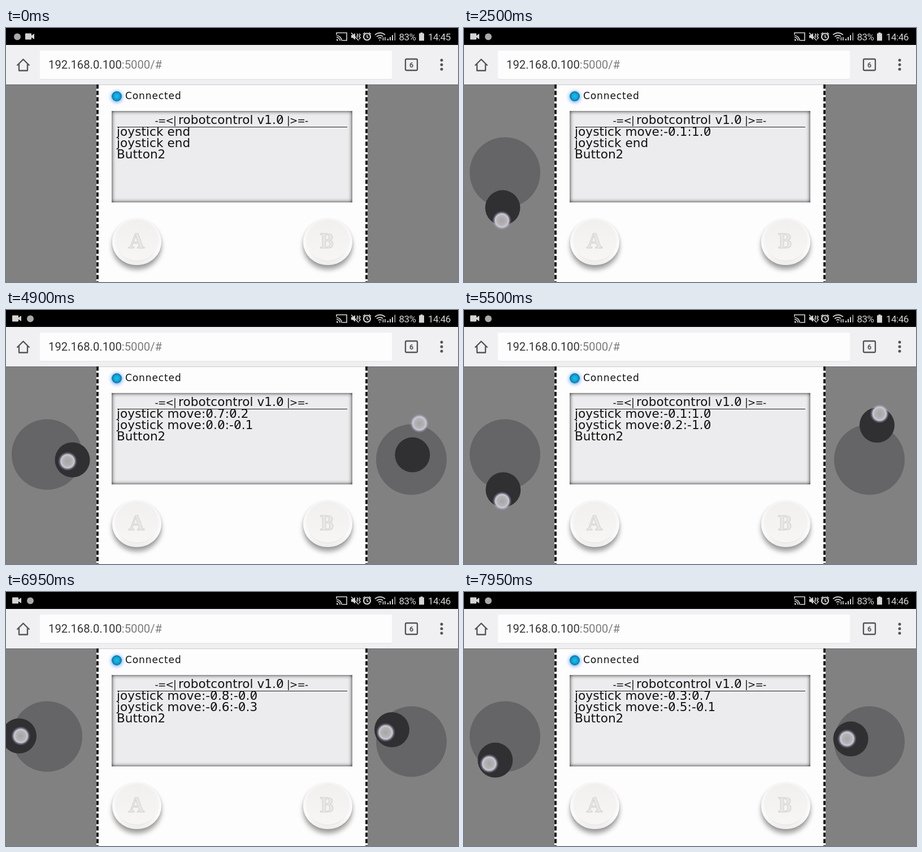
Write an HTML page that moves like this. It is 800 px wide and 450 px high and loops after 8000 ms.

```html
<!DOCTYPE html>
<html lang="en">
<head>
<meta charset="utf-8">
<title>robotcontrol</title>
<style>
  html, body { margin: 0; width: 100%; height: 100%; overflow: hidden; background: #828182; }
  .stage { position: relative; width: 800px; height: 450px; overflow: hidden; }
  .stage > * { position: absolute; box-sizing: border-box; }
  .page { left: 160px; top: 100px; width: 480px; height: 350px; background: #fefdfe; }
  .led { left: 187px; top: 112px; width: 18px; height: 18px; border-radius: 50%;
    background: radial-gradient(circle, #12c4e4 0, #0fa6d6 40%, #0b70ae 70%, #104a78 100%);
    box-shadow: 0 1px 6px 1px #6fa8f4; }
  .lcd { left: 187px; top: 146.5px; width: 426px; height: 162px; background: #ecebed;
    box-shadow: inset 0 0 7px rgba(0,0,0,.9); }
  .btn { top: 338px; width: 87px; height: 82px; border-radius: 50%;
    background: linear-gradient(#f6f5f4, #fcfbfb 70%, #eeedeb);
    box-shadow: 0 8px 9px rgba(0,0,0,.36), 0 1px 4px rgba(0,0,0,.12); }
  .btn::before { content: ""; position: absolute; left: 6px; top: 2px; width: 75px; height: 72px;
    border-radius: 50%; background: linear-gradient(#f1f0ee, #f7f6f4);
    box-shadow: 0 1px 3px rgba(0,0,0,.07); }
  .a { left: 188px; }
  .b { left: 526px; }
  svg { left: 0; top: 0; display: block; }
  .lcdtext { font: 21.5px "DejaVu Sans", sans-serif; letter-spacing: .1px; fill: #111; }
  .sign { font-size: 17px; letter-spacing: -.7px; }
  .bar { font: 17px Roboto, sans-serif; letter-spacing: -.5px; fill: #d4d4d4; }
  .cap { font: bold 37px "Noto Serif", serif; text-anchor: middle; fill: #e8e7e5;
    stroke: #d2d0ce; stroke-width: 1; }
</style>
</head>
<body>
<div class="stage">
  <div class="page"></div>
  <div class="led"></div>
  <div class="lcd"></div>
  <div class="btn a"></div>
  <div class="btn b"></div>
  <svg width="800" height="450" viewBox="0 0 800 450">
    <defs>
      <radialGradient id="touch">
        <stop offset="0" stop-color="#a6a4a6"/>
        <stop offset=".5" stop-color="#b5b3b6"/>
        <stop offset=".7" stop-color="#cccbd2"/>
        <stop offset=".78" stop-color="#c0c0da" stop-opacity=".6"/>
        <stop offset="1" stop-color="#9090b4" stop-opacity="0"/>
      </radialGradient>
    </defs>

    <path d="M162 100V450M638 100V450" stroke="#0b0b0b" stroke-width="3.75" stroke-dasharray="7.5 3.75"/>

    <text x="211" y="126" class="lcdtext" style="font-size:17px;letter-spacing:.9px">Connected</text>
    <text class="lcdtext" y="170" id="title"><tspan class="sign" x="263.5">-=&lt;|</tspan><tspan x="305">robotcontrol v1.0</tspan><tspan class="sign" x="497">|&gt;=-</tspan></text>
    <path d="M197 175.5H604" stroke="#222"/>
    <text class="lcdtext" x="196" y="191" id="line1"></text>
    <text class="lcdtext" x="196" y="211" id="line2"></text>
    <text class="lcdtext" x="196" y="231">Button2</text>
    <path id="slashes" stroke="#111" stroke-width="1.5"/>

    <text class="cap" x="231" y="390">A</text>
    <text class="cap" x="568" y="390">B</text>

    <g id="sticks"></g>

    <!-- browser toolbar -->
    <path d="M0 100.5H800" stroke="#000" stroke-opacity=".2"/>
    <path d="M0 30H800V100H0Z" fill="#f0eff1"/>
    <rect x="60" y="41" width="623" height="50.5" rx="2" fill="#dddcde"/>
    <rect x="60" y="40" width="623" height="50.5" rx="2" fill="#fefdfe"/>
    <g fill="none" stroke="#545355" stroke-width="2.3">
      <path d="M19.5 66.5L30.5 55.5L41.5 66.5M23 64V75.5H38V64" stroke-linejoin="round"/>
      <rect x="707" y="55" width="21" height="20" rx="2"/>
    </g>
    <text x="717.5" y="69.5" text-anchor="middle" fill="#545355" style="font:bold 12.5px Roboto,sans-serif">6</text>
    <g fill="#545355">
      <circle cx="771" cy="57" r="2.5"/><circle cx="771" cy="65" r="2.5"/><circle cx="771" cy="73" r="2.5"/>
    </g>
    <text x="75" y="72" fill="#353436" style="font:20.25px Roboto,sans-serif">192.168.0.100<tspan fill="#7b7a7c">:5000/#</tspan></text>

    <!-- status bar -->
    <path d="M0 0H800V30H0Z" fill="#000"/>
    <g fill="#d4d4d4">
      <path id="camera" d="M1 9.5H10Q11 9.5 11 10.5V13.5L16 10V20L11 16.5V19.5Q11 20.5 10 20.5H1Q0 20.5 0 19.5V10.5Q0 9.5 1 9.5Z"/>
      <circle id="badge" cx="8" cy="15.5" r="6" fill="#a9a9a9"/>
      <path d="M611 12.5H614L618 9V21L614 17.5H611Z"/>
      <path d="M675 22V19H677V22ZM679 22V16H681V22ZM683 22V12.5H685V22Z"/>
      <path d="M687 22V8.5H689.5V22Z" fill="#777"/>
      <path d="M733.5 8H737.5V9.5H740V22.5H731V9.5H733.5Z"/>
      <path d="M585 19.5A3 3 0 0 1 588 22.5H585Z"/>
    </g>
    <g fill="none" stroke="#d4d4d4" stroke-width="1.6">
      <path d="M585 12V8.5H603V22H595M585 16.5A6 6 0 0 1 591 22.5M585 13.5A9 9 0 0 1 594 22.5"/>
      <path d="M611 8.5L624 22M621 10L623 12L621 14.5L623 17M625 10L627 12L625 14.5L627 17L625 20"/>
      <circle cx="639" cy="15.5" r="6" stroke-width="2.2"/>
      <path d="M639 12V16L641.5 17.5M632 11L635.5 8M646 11L642.5 8"/>
      <path d="M653 12Q662 5 671 12M656 15.3Q662 11 667 15M659 18.2Q662 16 664.5 18.2" stroke-width="1.8"/>
      <path d="M661.5 20.5V22.5M667.5 22V16.5M671 16V22"/>
    </g>
    <text class="bar" x="695.5" y="21.5">83%</text>
    <text class="bar" x="747" y="21.5" id="clock"></text>
  </svg>
</div>
<script>
const LOOP = 8000, STEP = 50, LAG = 60, REACH = 62.5;
const NS = 'http://www.w3.org/2000/svg';
const $ = id => document.getElementById(id);

// turning points of each finger: time, x, y
const leftPath = [
  [600, 72, 256], [1250, 73, 184], [2350, 67, 341], [2500, 67, 341],
  [3500, 12, 260], [4300, 125, 262], [4840, 117.5, 265.5], [4900, 109, 268],
  [5450, 68, 342], [5900, 65, 240], [6100, 66, 256], [6420, 67, 342],
  [6890, 23, 255], [7450, 120, 258], [8150, 26, 315]
];
const rightPath = [
  [4815, 717.5, 265], [4950, 738, 172], [6100, 728.5, 208], [6890, 683, 244],
  [7050, 655, 256], [7500, 758, 263], [7980, 677, 260]
];

function slope(path, i, k) {
  if (i < 1 || i > path.length - 2) return 0;
  const rate = j => (path[j + 1][k] - path[j][k]) / (path[j + 1][0] - path[j][0]);
  const a = rate(i - 1), b = rate(i);
  return a * b > 0 ? 2 * a * b / (a + b) : 0;
}

// smooth curve that never overshoots its points
function at(path, t) {
  const last = path.length - 1;
  if (t <= path[0][0]) return path[0].slice(1);
  if (t >= path[last][0]) return path[last].slice(1);
  let i = 0;
  while (path[i + 1][0] <= t) i++;
  const p = path[i], q = path[i + 1], h = q[0] - p[0], u = (t - p[0]) / h;
  const ease = u * u * (3 - 2 * u);
  return [1, 2].map(k => p[k] + (q[k] - p[k]) * ease
    + h * u * (1 - u) * ((1 - u) * slope(path, i, k) - u * slope(path, i + 1, k)));
}

function add(parent, tag, attrs) {
  const el = document.createElementNS(NS, tag);
  for (const name in attrs) el.setAttribute(name, attrs[name]);
  return parent.appendChild(el);
}

function move(el, [x, y]) {
  el.setAttribute('transform', `translate(${x.toFixed(2)} ${y.toFixed(2)})`);
}

function makeStick(path, cx, cy, line) {
  const group = add($('sticks'), 'g', {});
  add(group, 'circle', { cx, cy, r: REACH, fill: '#656466' });
  const knob = add(group, 'circle', { r: 31, fill: '#302f31' });
  const touch = add(group, 'circle', { r: 17, fill: 'url(#touch)' });
  return t => {
    const active = t >= path[0][0];
    group.style.display = active ? '' : 'none';
    if (!active) {
      line.textContent = 'joystick end';
      return;
    }
    // the knob trails the finger and stays within reach
    const [x, y] = at(path, t - LAG);
    const dx = x - cx, dy = y - cy;
    const k = Math.min(1, REACH / (Math.hypot(dx, dy) || 1));
    move(knob, [cx + dx * k, cy + dy * k]);
    move(touch, at(path, t));
    const show = v => (v * k / REACH).toFixed(1);
    line.textContent = `joystick move:${show(dx)}:${show(dy)}`;
  };
}

const lines = [$('title'), $('line1'), $('line2')];
const sticks = [
  makeStick(leftPath, 72.5, 256, lines[1]),
  makeStick(rightPath, 717.5, 265, lines[2])
];

function slashZeros() {
  let d = '';
  for (const line of lines) {
    [...line.textContent].forEach((c, i) => {
      if (c !== '0') return;
      const p = line.getStartPositionOfChar(i);
      d += `M${p.x + 3.2} ${p.y - 2.6}l7.2 -10.4`;
    });
  }
  $('slashes').setAttribute('d', d);
}

function draw(t) {
  const swap = Math.min(1, t / 300);
  move($('camera'), [34 - 23 * swap, 0]);
  move($('badge'), [12 + 23 * swap, 0]);
  $('clock').textContent = t < 900 ? '14:45' : '14:46';
  sticks.forEach(update => update(t));
  slashZeros();
}

const start = performance.now();
let shown = -1;
function tick() {
  const t = Math.floor((performance.now() - start) % LOOP / STEP) * STEP;
  if (t !== shown) draw(shown = t);
  requestAnimationFrame(tick);
}
tick();
</script>
</body>
</html>
```
